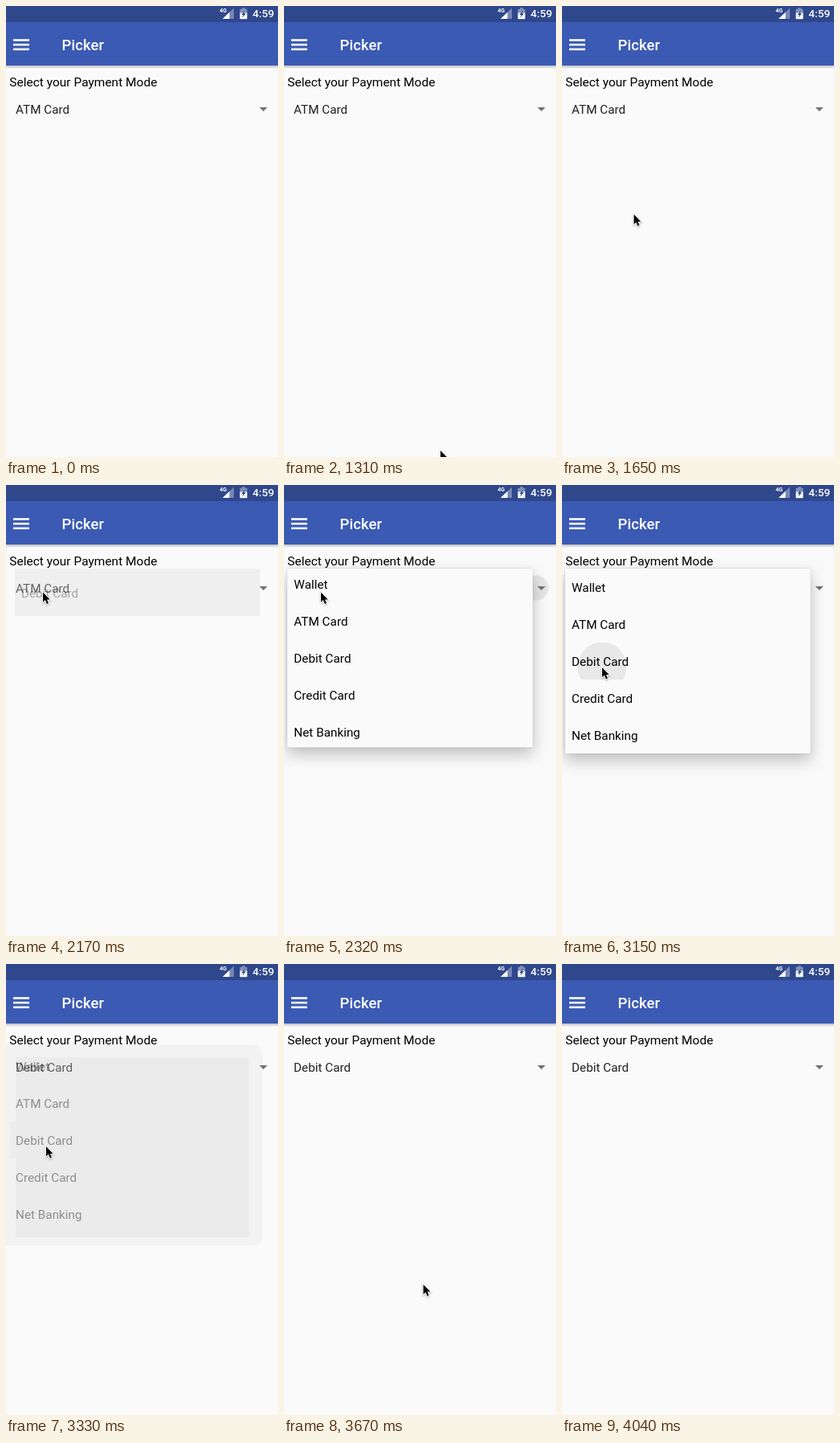
These frames come from a looping animation (339x561 px, 4.28 s). An HTML page with a canvas:

```html
<!DOCTYPE html>
<html lang="en">
<head>
<meta charset="utf-8">
<title>Picker</title>
<style>
  html, body { margin: 0; width: 100%; height: 100%; overflow: hidden; background: #fafafa; }
  canvas { display: block; width: 339px; height: 561px; }
</style>
</head>
<body>
<canvas id="stage"></canvas>
<script>
const W = 339, H = 561, LOOP = 4280;
const canvas = document.getElementById('stage');
const dpr = window.devicePixelRatio || 1;
canvas.width = W * dpr;
canvas.height = H * dpr;
const ctx = canvas.getContext('2d');

const ITEMS = ['Wallet', 'ATM Card', 'Debit Card', 'Credit Card', 'Net Banking'];
const POPUP = { x: 4, y: 104, w: 305.5, h: 230, row: 46 };
const OPEN = 2168, PRESS = 3150, CLOSE = 3270, CLOSED = 3430;

// Pointer path: time, x, y, easing used to reach the point
const PATH = [
  [1308, 194, 551],
  [1370, 194, 551],
  [1810, 44, 133, 'smooth'],
  [1840, 45, 131.5, 'step'],
  [2400, 45, 131.5],
  [2550, 50.5, 185, 'smooth'],
  [2670, 49, 222, 'out'],
  [2760, 49, 225, 'out'],
  [3420, 49, 225],
  [3670, 172, 396, 'in'],
  [4010, 320, 556, 'out'],
];
const EASE = {
  linear: u => u,
  step: u => u < 1 ? 0 : 1,
  in: u => u * u * 0.5 + u * 0.5,
  out: u => u * 1.5 - u * u * 0.5,
  smooth: u => u * u * (3 - 2 * u),
};

const clamp = v => Math.max(0, Math.min(1, v));
const ramp = (t, a, b) => clamp((t - a) / (b - a));

// cubic-bezier(.4, 0, .2, 1)
function fastOutSlowIn(x) {
  let lo = 0, hi = 1;
  for (let i = 0; i < 18; i++) {
    const s = (lo + hi) / 2, r = 1 - s;
    if (1.2 * s * r * r + 0.6 * s * s * r + s * s * s < x) lo = s; else hi = s;
  }
  return lo * lo * (3 - 2 * lo);
}

function rect(x, y, w, h, fill) {
  ctx.fillStyle = fill;
  ctx.fillRect(x, y, w, h);
}

function poly(points, fill) {
  ctx.beginPath();
  points.forEach(([x, y]) => ctx.lineTo(x, y));
  ctx.closePath();
  ctx.fillStyle = fill;
  ctx.fill();
}

function roundRect(x, y, w, h, r, fill) {
  ctx.beginPath();
  ctx.roundRect(x, y, w, h, r);
  ctx.fillStyle = fill;
  ctx.fill();
}

function disc(x, y, r, fill) {
  ctx.beginPath();
  ctx.arc(x, y, r, 0, Math.PI * 2);
  ctx.fillStyle = fill;
  ctx.fill();
}

function text(str, x, y, size = 15.3, fill = '#000', weight = 400) {
  ctx.font = `${weight} ${size}px Roboto, sans-serif`;
  ctx.fillStyle = fill;
  ctx.fillText(str, x, y);
}

function drawStatusBar() {
  rect(0, 0, W, 20, '#2f478b');
  text('4G', 266.3, 8.4, 7, '#fff', 700);
  poly([[284, 2.5], [284, 16], [270, 16]], 'rgba(255,255,255,.35)');
  poly([[278.5, 7.8], [278.5, 16], [270, 16]], '#fff');
  rect(294, 2.3, 4, 1.5, 'rgba(255,255,255,.4)');
  rect(291.5, 3.8, 9, 4.6, 'rgba(255,255,255,.4)');
  rect(291.5, 8.4, 9, 7.8, '#fff');
  poly([[298, 5.4], [293.4, 11], [295.7, 11], [294.4, 14.8], [299, 9.3], [296.6, 9.3]], '#2f478b');
  text('4:59', 307.3, 14.4, 13.7, '#fff', 500);
}

function drawAppBar() {
  const fade = ctx.createLinearGradient(0, 74, 0, 78);
  fade.addColorStop(0, 'rgba(0,0,0,.25)');
  fade.addColorStop(1, 'rgba(0,0,0,0)');
  rect(0, 74, W, 4, fade);
  rect(0, 20, W, 54, '#3b5ab3');
  for (let i = 0; i < 3; i++) rect(9, 41.2 + i * 5.7, 20, 2.5, '#fff');
  text('Picker', 69.5, 55, 18.6, '#fff', 500);
}

function drawForm(t) {
  text('Select your Payment Mode', 4.3, 99.6, 15.5);
  const glow = 1 - ramp(t, 2320, 2520);
  if (t >= OPEN + 60 && glow) disc(314, 128, 15.5, `rgba(0,0,0,${0.08 * glow})`);
  text(t < CLOSE ? 'ATM Card' : 'Debit Card', 12, 133.8, 15.3, '#212121');
  poly([[315.8, 125.9], [325.8, 125.9], [320.8, 130.9]], '#737373');
}

function drawItems(dx, dy) {
  ITEMS.forEach((name, i) =>
    text(name, 12 + dx, 133.4 + i * POPUP.row + dy));
}

function drawShadow(x, y, w, h, strength) {
  ctx.save();
  ctx.shadowColor = `rgba(0,0,0,${0.25 * strength})`;
  ctx.shadowBlur = 19 * dpr;
  ctx.shadowOffsetY = 8 * dpr;
  roundRect(x, y, w, h, 2, '#fafafa');
  ctx.shadowColor = `rgba(0,0,0,${0.2 * strength})`;
  ctx.shadowBlur = 2 * dpr;
  ctx.shadowOffsetY = 0;
  roundRect(x, y, w, h, 2, '#fafafa');
  ctx.restore();
}

function drawOpenPopup(t) {
  const left = 1 - fastOutSlowIn(ramp(t, 2135, 2385));
  const dy = -91 * left, dx = 7.4 * left;
  const alpha = ramp(t, 2135, 2250);
  const { x, y, w, h, row } = POPUP;
  const box = [x + dx, y, w, h + 2 * dy];

  if (alpha === 1) drawShadow(...box, ramp(t, 2200, 2320));
  ctx.save();
  ctx.beginPath();
  ctx.rect(...box);
  ctx.clip();
  if (alpha < 1) rect(...box, 'rgba(0,0,0,.07)');
  ctx.globalAlpha = alpha;
  rect(...box, '#fafafa');
  if (t >= PRESS) {
    ctx.save();
    ctx.beginPath();
    ctx.rect(x, y + 2 * row, w, row);
    ctx.clip();
    const grow = ramp(t, PRESS - 30, CLOSE);
    disc(50, 226, 20 + 245 * grow * grow, 'rgba(0,0,0,.07)');
    ctx.restore();
  }
  drawItems(dx, dy);
  ctx.restore();
}

function drawClosingPopup(t) {
  const alpha = 1 - ramp(t, CLOSE - 40, CLOSED);
  const shade = ramp(alpha, 0, 0.42);
  roundRect(-12, 100, 332, 250, 12, `rgba(0,0,0,${0.03 * shade})`);
  ctx.save();
  ctx.globalAlpha = alpha * 0.6;
  rect(12, 116, 291, 224, '#fafafa');
  ctx.restore();
  rect(12, 116, 291, 224, `rgba(0,0,0,${0.04 * shade})`);
  rect(5, 196, 7, 46, `rgba(0,0,0,${0.02 * shade})`);
  ctx.save();
  ctx.globalAlpha = alpha * 0.8;
  drawItems(0, 0);
  ctx.restore();
}

function pointerAt(t) {
  for (let i = 1; i < PATH.length; i++) {
    const [t0, x0, y0] = PATH[i - 1];
    const [t1, x1, y1, ease = 'linear'] = PATH[i];
    if (t < t1) {
      const k = EASE[ease](ramp(t, t0, t1));
      return [x0 + (x1 - x0) * k, y0 + (y1 - y0) * k];
    }
  }
  return PATH[PATH.length - 1].slice(1, 3);
}

function drawPointer(t) {
  if (t < PATH[0][0] || t >= 4038) return;
  const [x, y] = pointerAt(t);
  ctx.save();
  ctx.translate(x + 1, y + 2);
  ctx.beginPath();
  [[0, 0], [0, 12.2], [2.8, 9.6], [4.9, 14.4], [7, 13.5], [5, 8.9], [8.8, 8.9]]
    .forEach(([px, py]) => ctx.lineTo(px, py));
  ctx.closePath();
  ctx.shadowColor = 'rgba(0,0,0,.3)';
  ctx.shadowBlur = 2 * dpr;
  ctx.shadowOffsetY = dpr;
  ctx.lineWidth = 2;
  ctx.strokeStyle = '#fff';
  ctx.stroke();
  ctx.shadowColor = 'transparent';
  ctx.fillStyle = '#000';
  ctx.fill();
  ctx.restore();
}

function draw(t) {
  ctx.setTransform(dpr, 0, 0, dpr, 0, 0);
  rect(0, 0, W, H, '#fafafa');
  drawForm(t);
  if (t >= OPEN && t < CLOSE) drawOpenPopup(t);
  else if (t >= CLOSE && t < CLOSED) drawClosingPopup(t);
  drawAppBar();
  drawStatusBar();
  drawPointer(t);
}

const start = performance.now();
function tick() {
  draw((performance.now() - start) % LOOP);
  requestAnimationFrame(tick);
}
tick();
</script>
</body>
</html>
```
